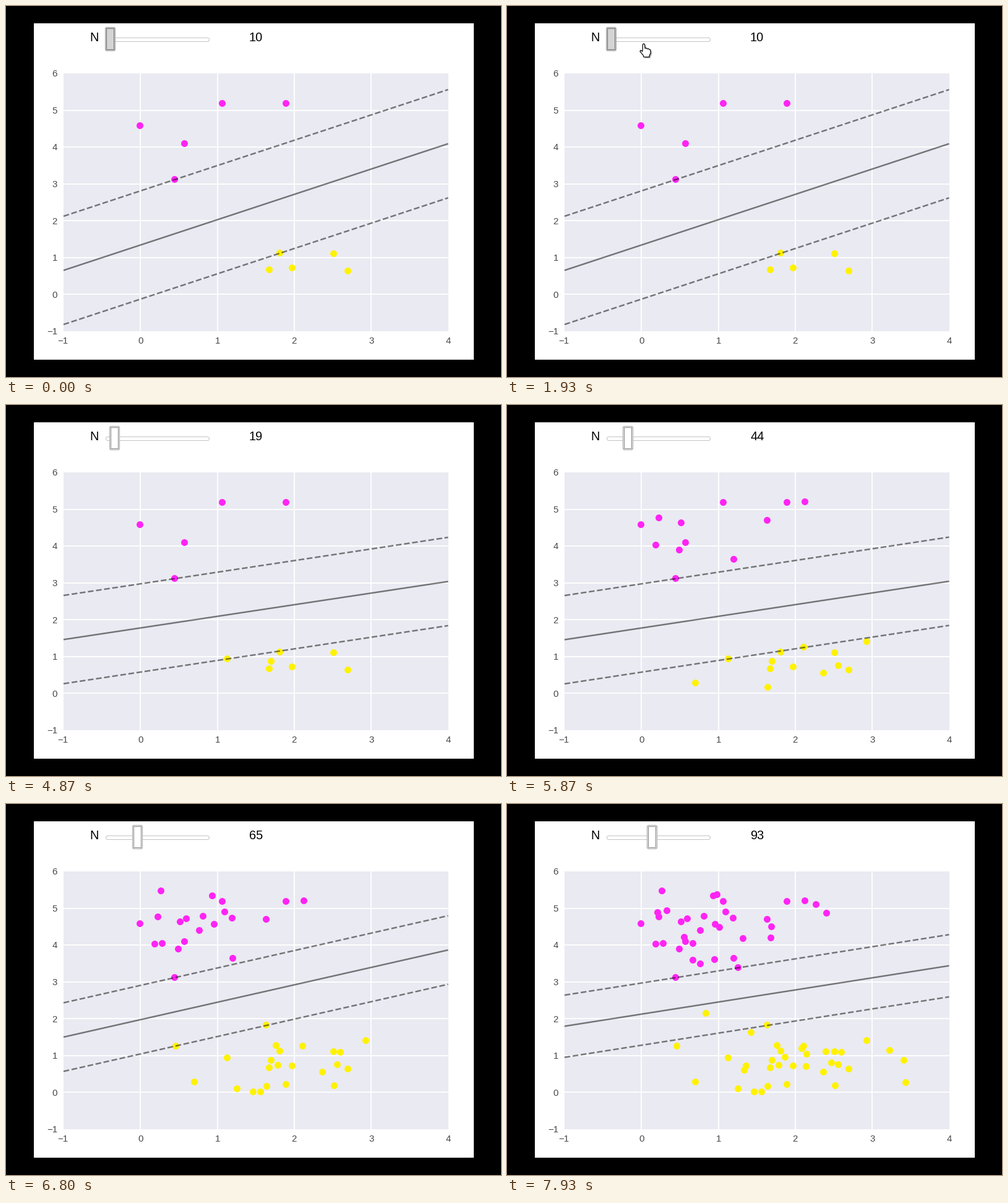
These frames come from a looping animation (800 px wide and 600 px high, 8000 ms). A matplotlib script:

```python
import numpy as np
import matplotlib.pyplot as plt
from matplotlib.animation import FuncAnimation
from matplotlib.patches import FancyBboxPatch, Polygon, Rectangle

W, H, DPI = 800, 600, 100
STEP, FRAMES = 40, 200
PX = 72 / DPI
LEFT, RIGHT, TOP, BOTTOM = 93, 714.5, 109, 526
PAGE, PANEL, INK = "#ffffff", "#eaeaf2", "#484848"
MAGENTA, YELLOW = "#ff24f4", "#fff200"

plt.rcParams["font.family"] = "Liberation Sans"


def sx(x):
    return LEFT + (x + 1) * (RIGHT - LEFT) / 5


def sy(y):
    return BOTTOM - (y + 1) * (BOTTOM - TOP) / 7


def blobs(n=200, std=0.6):
    """Two shuffled Gaussian clusters."""
    rng = np.random.RandomState(0)
    centers = rng.uniform(-10, 10, (2, 2))
    pts = np.vstack([c + rng.normal(scale=std, size=(n // 2, 2)) for c in centers])
    order = np.arange(n)
    rng.shuffle(order)
    return pts[order], np.repeat([1, -1], n // 2)[order]


POINTS, SIGNS = blobs()
fits = {}


def solve(pts, signs, c=1.0, tol=1e-4):
    """Linear soft-margin classifier by pairwise dual ascent."""
    kernel = pts @ pts.T
    lo, hi = np.minimum(c * signs, 0), np.maximum(c * signs, 0)
    beta = np.zeros(len(pts))
    for _ in range(3000):
        g = signs - kernel @ beta
        i = np.argmax(np.where(beta < hi - 1e-9, g, -np.inf))
        j = np.argmin(np.where(beta > lo + 1e-9, g, np.inf))
        gap = g[i] - g[j]
        if gap < tol:
            break
        curve = kernel[i, i] + kernel[j, j] - 2 * kernel[i, j]
        step = min(gap / curve, hi[i] - beta[i], beta[j] - lo[j])
        beta[i] += step
        beta[j] -= step
    return beta @ pts, (g[i] + g[j]) / 2


def fit(n):
    """Slope and intercepts of the lower margin, boundary and upper margin."""
    if n not in fits:
        w, b = solve(POINTS[:n], SIGNS[:n])
        fits[n] = -w[0] / w[1], (np.array([-1, 0, 1]) - b) / w[1]
    return fits[n]


def slider_value(t):
    """One key press, then auto-repeat."""
    if t < 3930:
        return 10
    if t < 4580:
        return 11
    return int(np.interp(t, [4580, 4840, 5840, 6800, 7920], [12, 19.2, 44.2, 65.3, 93.3]))


def plotted_value(t):
    """The plot trails behind the slider."""
    if t < 4200:
        return 10
    if t < 4800:
        return 11
    return int(np.interp(t, [4840, 5840, 6800, 7920], [12.3, 25.3, 44.3, 72.3]))


fig = plt.figure(figsize=(W / DPI, H / DPI), dpi=DPI, facecolor="black")
ax = fig.add_axes([0, 0, 1, 1])
ax.set_xlim(0, W)
ax.set_ylim(H, 0)
ax.axis("off")


def box(x0, y0, x1, y1, color, z):
    return ax.add_patch(Rectangle((x0, y0), x1 - x0, y1 - y0, fc=color, ec="none", zorder=z))


def text(x, y, s, size, color, ha="left"):
    return ax.text(x, y, s, fontsize=size * PX, color=color, ha=ha, va="baseline", zorder=6)


def tick(x, y, value, ha):
    text(x, y, str(value).replace("-", "\u2212"), 15, INK, ha)


def rounded(x, y, w, h, r, fc, ec):
    patch = FancyBboxPatch((x, y), w, h, boxstyle=f"round,pad=0,rounding_size={r}",
                           fc=fc, ec=ec, lw=PX, zorder=5)
    return ax.add_patch(patch)


page = box(45, 28, 756, 572, PAGE, 0)
box(LEFT, TOP, RIGHT, BOTTOM, PANEL, 1)

for x in range(-1, 5):
    if -1 < x < 4:
        ax.plot([sx(x)] * 2, [TOP, BOTTOM], color="white", lw=1.9 * PX, zorder=2)
    tick(sx(x) - (1.5 if x < 0 else 0), 546, x, "center")
for y in range(-1, 7):
    if -1 < y < 6:
        ax.plot([LEFT, RIGHT], [sy(y)] * 2, color="white", lw=1.9 * PX, zorder=2)
    tick(83, sy(y) + 5.3, y, "right")

dots = [ax.plot([], [], "o", ms=11 * PX, mew=0, color=c, zorder=3, snap=False)[0]
        for c in (MAGENTA, YELLOW)]
lines = [ax.plot([], [], ls, color="black", alpha=0.5, lw=2.5 * PX, zorder=4,
                 dash_capstyle="butt", solid_capstyle="butt")[0] for ls in ("--", "-", "--")]

text(135.5, 57, "N", 20, "black")
readout = text(393, 57, "", 20, "black")
rounded(161.5, 51.5, 167, 6, 3, "white", "#c4c4c4")
handle = rounded(160.5, 34.5, 16, 38, 2.5, "white", "#a0a0a0")
focus, = ax.plot([], [], color="black", lw=PX, ls=(0.5, (1, 1)), zorder=7,
                 dash_capstyle="butt", snap=False)

HAND = np.array([(-1.5, 0.5), (0, -0.5), (1.5, 0.5), (2, 7), (4.5, 6.5), (5.5, 8), (8, 7.5),
                 (9, 9), (11, 9.5), (11, 15), (9, 19), (9, 21), (0, 21), (-1, 18),
                 (-6, 12), (-5, 10), (-2, 12)])
ARROW = np.array([(0, 0), (0, 17), (4, 13.5), (7, 20), (9.5, 19), (6.5, 12.5), (12, 12)])
shadow = ax.add_patch(Polygon(HAND, fc="black", ec="none", alpha=0.3, zorder=8))
cursor = ax.add_patch(Polygon(HAND, fc="white", ec="black", lw=1.2 * PX, zorder=9))
for part in (shadow, cursor):
    part.set_clip_path(page)

PATH_T = [1400, 1860, 1960, 2120, 2270, 2560, 2920]
PATH_X = [748, 221, 221, 167, 167, 300, 474]
PATH_Y = [214, 61.5, 61.5, 50, 50, 88, 14]


def draw_cursor(t):
    shown = PATH_T[0] <= t < PATH_T[-1]
    cursor.set_visible(shown)
    shadow.set_visible(shown)
    if shown:
        tip = np.array([np.interp(t, PATH_T, PATH_X), np.interp(t, PATH_T, PATH_Y)])
        on_slider = 155 < tip[0] < 335 and 32 < tip[1] < 76
        shape = HAND if on_slider else ARROW
        cursor.set_xy(shape + tip)
        shadow.set_xy(shape + tip + 2)


def draw(i):
    t = i * STEP
    value = slider_value(t)
    x = 160.5 + round((value - 10) * 0.795)
    readout.set_text(str(value))
    handle.set_x(x)
    handle.set_facecolor("#d4d4d4" if t < 3930 else "white")
    focus.set_data([x + 2, x + 14, x + 14, x + 2, x + 2], [36.5, 36.5, 70.5, 70.5, 36.5])

    n = plotted_value(t)
    for sign, d in zip((1, -1), dots):
        p = POINTS[:n][SIGNS[:n] == sign]
        d.set_data(sx(p[:, 0]) - 0.7, sy(p[:, 1]) - 0.7)
    slope, levels = fit(n)
    for line, b in zip(lines, levels):
        line.set_data([LEFT, RIGHT], [sy(b - slope), sy(b + 4 * slope)])
    draw_cursor(t)
    return [readout, handle, focus, *dots, *lines, shadow, cursor]


anim = FuncAnimation(fig, draw, frames=FRAMES, interval=STEP, repeat=True, repeat_delay=0)
plt.show()
```
